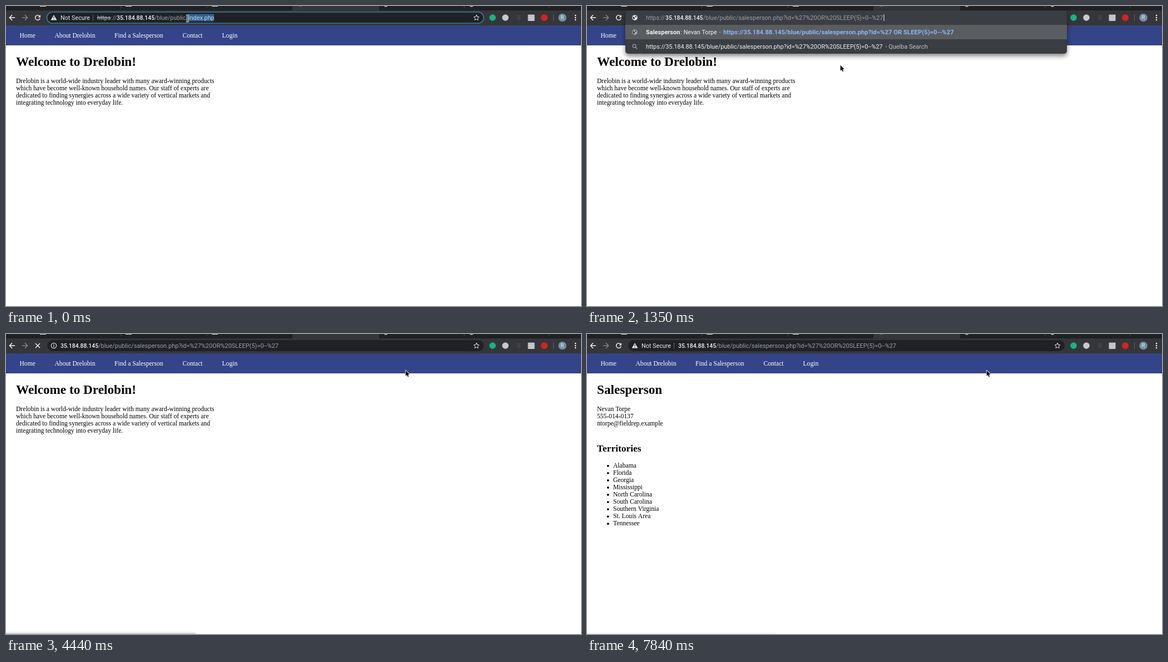
An HTML page with a canvas for the animation above (8 s loop, 1034x541 px).

```html
<!DOCTYPE html>
<html lang="en">
<head>
<meta charset="utf-8">
<title>Browser session</title>
<style>
html, body { margin: 0; width: 100%; height: 100%; overflow: hidden; background: #fff; }
canvas { display: block; }
</style>
</head>
<body>
<canvas id="stage" width="1034" height="541"></canvas>
<script>
const c = document.getElementById('stage').getContext('2d');
const LOOP = 8000;
const BRAND = 'Drelobin', PERSON = 'Nevan Torpe', ENGINE = 'Quelba Search';
const HOST = '35.184.88.145', DIR = '/blue/public/';
const BASE = 'https://' + HOST + DIR;
const QUERY = 'salesperson.php?id=%27%20OR%20SLEEP(5)=0--%27';
const SPACED = QUERY.replaceAll('%20', ' ');
const GREY = '#9aa0a6', WHITE = '#f1f3f4', BLUE = '#8ab4f8', BAR = '#35363a', DARK = '#202124';

// Pointer stops: time, x, y
const PATH = [
  [300, 418, 83], [450, 455, 106], [2390, 490, 123], [2540, 538, 157], [2690, 572, 180],
  [3120, 589, 166], [3270, 609, 139], [3410, 628, 116], [3560, 645, 100],
  [3710, 666, 91], [3850, 688, 80], [4000, 706, 71], [4150, 718, 65]
];

function rect(x, y, w, h, color, r = 0) {
  c.fillStyle = color;
  c.beginPath();
  c.roundRect(x, y, w, h, r);
  c.fill();
}
function disc(x, y, r, color) {
  c.fillStyle = color;
  c.beginPath();
  c.arc(x, y, r, 0, 7);
  c.fill();
}
function line(points, color, width = 1) {
  c.strokeStyle = color;
  c.lineWidth = width;
  c.beginPath();
  points.forEach(([x, y]) => c.lineTo(x, y));
  c.stroke();
}
function poly(x, y, points, fill, stroke) {
  c.beginPath();
  points.forEach(([px, py]) => c.lineTo(x + px, y + py));
  c.closePath();
  if (stroke) {
    c.strokeStyle = stroke;
    c.lineWidth = 1.6;
    c.lineJoin = 'round';
    c.stroke();
  }
  c.fillStyle = fill;
  c.fill();
}
function ui(str, x, y, size, color, weight = 400) {
  c.font = `${weight} ${size}px Roboto, sans-serif`;
  c.fillStyle = color;
  c.fillText(str, x, y);
}
function serif(str, x, y, size = 11.6, color = '#000', weight = 400) {
  c.font = `${weight} ${size}px "Liberation Serif", "Times New Roman", serif`;
  c.fillStyle = color;
  c.fillText(str, x, y);
}
function globe(x, y, color) {
  disc(x, y, 4.8, color);
  poly(x, y, [[-3.5, -2], [-1, -1], [0, 1], [-1.5, 3.6], [-3.6, 1]], '#3a3d41');
  poly(x, y, [[0, -3.6], [3, -2.5], [2.5, 0], [.8, -1]], '#3a3d41');
}

function tabs(t) {
  rect(0, 0, 1034, 8, DARK);
  rect(515, 0, 156, 8, BAR, [0, 0, 0, 0]);
  rect(505, 0, 10, 8, DARK, [0, 0, 4, 0]);
  rect(671, 0, 10, 8, DARK, [0, 0, 0, 4]);
  for (const x of [207, 361, 824, 977]) rect(x - .5, 0, 1, 4, '#4a4c50');
  for (const x of [61, 215, 370]) rect(x, 0, 11, 1, '#e8eaed');
  for (const x of [683, 837]) disc(x, -2.5, 4, '#c4c7ca');
  if (t >= 4440 && t < 6940) {
    const phase = (t - 4440) % 590;
    if (phase >= 150) disc(529.5, -2.3, 4.6, phase < 300 ? '#85878a' : '#e8eaed');
  } else if (t < 1950 || t >= 6940) {
    disc(529.5, -3, 4.2, '#6c6f73');
  }
}

function toolbar(loading) {
  rect(0, 8, 1034, 27, BAR);
  line([[6.5, 21], [16, 21]], WHITE, 1.5);
  line([[11, 16.3], [6.4, 21], [11, 25.7]], WHITE, 1.5);
  line([[29, 21], [38.5, 21]], '#85878b', 1.4);
  line([[34, 16.3], [38.6, 21], [34, 25.7]], '#85878b', 1.4);
  if (loading) {
    line([[53, 17], [61, 25]], WHITE, 1.5);
    line([[61, 17], [53, 25]], WHITE, 1.5);
  } else {
    c.strokeStyle = WHITE;
    c.lineWidth = 1.5;
    c.beginPath();
    c.arc(57, 21, 4.3, .3, 5.5);
    c.stroke();
    poly(57, 21, [[5, -5], [5, -.4], [.4, -.4]], WHITE);
  }
  disc(875, 21, 5.8, '#17b683');
  disc(898, 21, 5.8, '#c6c8ca');
  for (const y of [18, 21, 24]) rect(918.5, y - .5, 7, 1, '#515459');
  rect(938.5, 15.5, 12, 11.5, '#c3c5c7', 1);
  disc(968, 21, 6, '#d5241b');
  rect(984, 15, 1, 12, '#5f6368');
  disc(1000.5, 21, 7.3, '#708fa3');
  ui('R', 997.6, 24.4, 9.2, WHITE);
  for (const y of [17, 21, 25]) disc(1024, y, 1.3, WHITE);
}

function star() {
  const pts = Array.from({ length: 10 }, (_, i) => {
    const a = i * Math.PI / 5 - Math.PI / 2, r = i % 2 ? 2.4 : 5.2;
    return [846 + r * Math.cos(a), 21.3 + r * Math.sin(a)];
  });
  line([...pts, pts[0], pts[1]], '#dadce0', 1);
}

function warning() {
  poly(86, 21, [[0, -5], [5.4, 4.5], [-5.4, 4.5]], '#e8eaed');
  rect(85.4, 19, 1.2, 3, DARK);
  rect(85.4, 23, 1.2, 1.2, DARK);
  ui('Not Secure', 98, 25, 10.8, '#e8eaed');
  rect(156, 15.5, 1, 11, '#5f6368');
}

function address(mode) {
  rect(74, 11, 785, 20, DARK, 10);
  star();
  if (mode === 'edit') {
    c.strokeStyle = '#2f7ca3';
    c.lineWidth = 1.6;
    c.beginPath();
    c.roundRect(73.5, 11, 785.5, 20, 10);
    c.stroke();
    warning();
    rect(327, 14.5, 47, 13, '#32618f');
    ui('https', 164, 25, 10.6, '#bdc1c6');
    rect(163.5, 20.8, 25, 1, '#bdc1c6');
    ui('://', 189, 25, 10.4, GREY);
    ui(HOST, 199, 25, 10.45, WHITE, 500);
    ui(DIR, 267, 25, 10.45, GREY);
    ui('index.php', 328, 25, 10.8, '#c9d6e4');
    return;
  }
  let x = 98;
  if (mode === 'loading') {
    c.strokeStyle = '#e8eaed';
    c.lineWidth = 1.1;
    c.beginPath();
    c.arc(86, 21, 4.7, 0, 7);
    c.stroke();
    rect(85.4, 20, 1.2, 3.6, '#e8eaed');
    rect(85.4, 18, 1.2, 1.2, '#e8eaed');
  } else {
    warning();
    x = 164;
  }
  ui(HOST, x, 25, 10.45, WHITE, 500);
  ui(DIR + QUERY, x + 68, 25, 10.98, GREY);
}

// Each row is a list of runs: [text, x, size, color, weight]
function dropdown(height, typed, size, caret, rows) {
  c.save();
  c.shadowColor = 'rgba(0,0,0,.5)';
  c.shadowBlur = 9;
  c.shadowOffsetY = 4;
  rect(69, 8, 794, height, '#3a3d41', 5);
  c.restore();
  rect(69, 34, 794, 26, '#5a5d60');
  globe(86, 21, '#e8eaed');
  ui('https://', 106, 25, 10.45, GREY);
  ui(HOST, 141, 25, 10.35, WHITE, 500);
  ui(typed, 208.5, 25, size, GREY);
  rect(caret, 15, 1, 12, WHITE);
  rows.forEach((runs, i) => {
    const y = 47 + i * 26;
    if (i === 1) {
      c.strokeStyle = GREY;
      c.lineWidth = 1.2;
      c.beginPath();
      c.arc(85, y - 1, 2.9, 0, 7);
      c.stroke();
      line([[87.2, y + 1.2], [90.3, y + 4.3]], GREY, 1.3);
    } else {
      globe(86, y, '#a4a8ac');
    }
    for (const [str, x, s, color, weight] of runs) ui(str, x, y + 4, s, color, weight);
  });
}

function shortList() {
  const site = [BRAND, 106, 10.8, WHITE], dash = x => ['-', x, 10.8, '#c0c3c6'];
  const seller = ['Salesperson: ' + PERSON, 106, 10.7, WHITE];
  const base = x => [BASE, x, 11.15, BLUE, 700];
  dropdown(157, DIR, 10.45, 268.5, [
    [site, dash(149), base(156.5)],
    [[BASE, 106, 10.42, WHITE], ['- ' + ENGINE, 272, 10.95, '#c0c3c6']],
    [seller, dash(233.5), base(241), [SPACED, 419, 11.1, BLUE]],
    [seller, dash(233.5), base(241), ['salesperson.php?id=1', 419, 10.8, BLUE]],
    [site, dash(149), base(156.5), ['index.php', 335, 10.8, BLUE]]
  ]);
}

function pastedList() {
  dropdown(78, DIR + QUERY, 10.98, 533.5, [
    [['Salesperson', 106, 11, WHITE, 700], [': ' + PERSON, 168.5, 10.7, WHITE],
      ['-', 237.5, 10.8, '#c0c3c6'], [BASE + SPACED, 245, 11.3, BLUE, 700]],
    [[BASE + QUERY, 106, 10.87, WHITE], ['- ' + ENGINE, 536.5, 10.95, '#c0c3c6']]
  ]);
}

function page(loaded) {
  rect(0, 35, 1034, 36, '#344489');
  const nav = [['Home', 24.5], ['About ' + BRAND, 87.5], ['Find a Salesperson', 195], ['Contact', 317.5], ['Login', 388.5]];
  for (const [str, x] of nav) serif(str, x, 57.3, 11.6, '#fff');
  const lines = loaded
    ? [PERSON, '555-014-0137', 'ntorpe@fieldrep.example']
    : [BRAND + ' is a world-wide industry leader with many award-winning products',
      'which have become well-known household names. Our staff of experts are',
      'dedicated to finding synergies across a wide variety of vertical markets and',
      'integrating technology into everyday life.'];
  serif(loaded ? 'Salesperson' : `Welcome to ${BRAND}!`, 18, 107.5, 23.2, '#000', 700);
  lines.forEach((str, i) => serif(str, 18, 139.2 + i * 13.05));
  if (!loaded) return;
  serif('Territories', 18, 212, 17.4, '#000', 700);
  ['Alabama', 'Florida', 'Georgia', 'Mississippi', 'North Carolina', 'South Carolina',
    'Southern Virginia', 'St. Louis Area', 'Tennessee'].forEach((str, i) => {
    const y = 241 + i * 13.05;
    disc(37.8, y - 3.2, 1.9, '#000');
    serif(str, 47, y);
  });
}

function statusEdge(t) {
  if (t < 2540) return;
  c.save();
  c.globalAlpha = t < 2690 ? .5 : t < 7540 ? 1 : t < 7840 ? .5 : .2;
  c.shadowColor = 'rgba(0,0,0,.3)';
  c.shadowBlur = 4;
  rect(-6, 540, 348, 12, '#c8c8c8', 4);
  c.restore();
}

function pointer(t) {
  if (t < 300) {
    for (const [color, w] of [[WHITE, 2.6], ['#202124', 1]]) {
      line([[326.5, 17], [326.5, 28]], color, w);
      line([[324, 16.5], [326.5, 17.5], [329, 16.5]], color, w);
      line([[324, 28.5], [326.5, 27.5], [329, 28.5]], color, w);
    }
    return;
  }
  const [, x, y] = PATH.findLast(p => p[0] <= t);
  poly(x + .7, y + .7, [[0, 0], [0, 10], [2.3, 8], [3.9, 11.6], [5.5, 10.9], [4, 7.4], [7, 7.2]], '#000', '#fff');
}

function draw(t) {
  const listed = t >= 1200 && t < 1950, loading = t >= 1950 && t < 6940, loaded = t >= 6940;
  rect(0, 0, 1034, 541, '#fff');
  page(loaded);
  tabs(t);
  toolbar(loading);
  if (!listed) address(loaded ? 'done' : loading ? 'loading' : 'edit');
  else if (t < 1350) shortList();
  else pastedList();
  statusEdge(t);
  pointer(t);
}

const start = performance.now();
function frame() {
  draw((performance.now() - start) % LOOP);
  requestAnimationFrame(frame);
}
frame();
</script>
</body>
</html>
```
